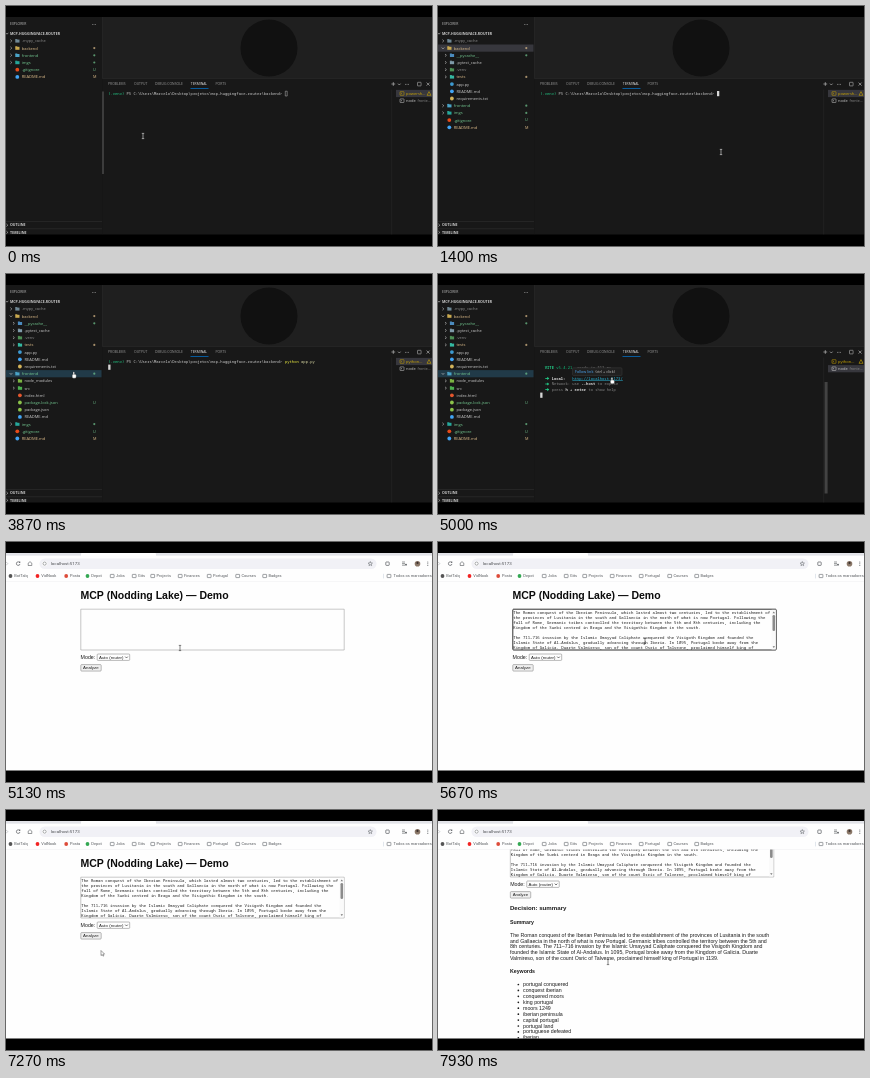
These frames come from a looping animation (426 by 240 pixels, 8000 ms). An HTML page with a canvas:

```html
<!DOCTYPE html>
<html lang="en">
<head>
<meta charset="utf-8">
<title>Router demo</title>
<style>
html, body { margin: 0; width: 100%; height: 100%; overflow: hidden; background: #000; }
canvas { display: block; width: 100vw; height: 100vh; }
</style>
</head>
<body>
<canvas id="stage"></canvas>
<script>
const W = 426, H = 240, LOOP = 8000, TOP = 11, BOTTOM = 228.5;
const canvas = document.getElementById('stage');
const ctx = canvas.getContext('2d');

const UI = '"Open Sans", "Noto Sans", sans-serif';
const CHROME = 'Roboto, sans-serif';
const ARIAL = '"Liberation Sans", Arial, sans-serif';
const MONO = '"Noto Sans Mono", "DejaVu Sans Mono", monospace';

const WHITE = '#cccccc', DIM = '#8c8c8c', GREEN = '#73c991', GOLD = '#e2c08d', WARN = '#cca700';
const INK = '#1c1c1c';

// Moments of the story, in ms
const AT = {
  openBackend: 680, focusTerminal: 1250, type: 1650, run: 2560, pillEnd: 3150,
  openFrontend: 3700, showNode: 4290, tooltip: 4800, browser: 5100,
  paste: 5470, analyze: 6660, result: 7420, scroll: 7620, scrollEnd: 7920
};

const mousePath = [
  [0, 137, 130], [130, 137, 130], [600, 22, 43], [760, 22, 43], [1200, 283, 146],
  [2850, 283, 146], [3580, 26, 101], [3780, 26, 101], [4220, 404, 95], [4340, 404, 95],
  [4780, 174, 106], [5150, 174, 106], [5600, 207, 99], [5850, 207, 99], [6480, 86, 126],
  [6720, 86, 126], [6960, 97, 152], [7200, 95, 143], [7460, 95, 143], [7720, 170, 152], [8000, 170, 152]
];

function mouseAt(t) {
  const i = Math.max(1, mousePath.findIndex(p => p[0] > t));
  const [t0, x0, y0] = mousePath[i - 1], [t1, x1, y1] = mousePath[i];
  const u = (t - t0) / (t1 - t0), e = u * u * (3 - 2 * u);
  return [x0 + (x1 - x0) * e, y0 + (y1 - y0) * e];
}

function box(x, y, w, h, color) {
  ctx.fillStyle = color;
  ctx.fillRect(x, y, w, h);
}
function rounded(x, y, w, h, r, fill, stroke, line = 0.4) {
  ctx.beginPath();
  ctx.roundRect(x, y, w, h, r);
  if (fill) { ctx.fillStyle = fill; ctx.fill(); }
  if (stroke) { ctx.strokeStyle = stroke; ctx.lineWidth = line; ctx.stroke(); }
}
function dot(x, y, r, color) {
  ctx.fillStyle = color;
  ctx.beginPath();
  ctx.arc(x, y, r, 0, 7);
  ctx.fill();
}
function poly(points, stroke, fill, line = 0.6) {
  ctx.beginPath();
  for (let i = 0; i < points.length; i += 2) ctx.lineTo(points[i], points[i + 1]);
  if (fill) { ctx.closePath(); ctx.fillStyle = fill; ctx.fill(); }
  if (stroke) { ctx.strokeStyle = stroke; ctx.lineWidth = line; ctx.stroke(); }
}
// y is the middle of the capital letters
function text(s, x, y, size, color, font = UI, weight = 400) {
  ctx.font = `${weight} ${size}px ${font}`;
  ctx.fillStyle = color;
  ctx.fillText(s, x, y + size * 0.35);
}
function chevron(x, y, open, color = WHITE) {
  poly(open ? [x - 1.3, y - 0.6, x, y + 0.8, x + 1.3, y - 0.6] : [x - 0.6, y - 1.3, x + 0.8, y, x - 0.6, y + 1.3], color);
}
function dots(x, y, color) {
  for (let i = -1; i < 2; i++) dot(x + i * 1.6, y, 0.45, color);
}
function folder(x, y, color) {
  box(x - 2, y - 1.8, 2, 1, color);
  box(x - 2, y - 1.3, 4.2, 3, color);
}

// ---------- editor ----------

// depth, chevron, icon colour, label, label colour, badge
const row = (depth, fold, icon, label, color = WHITE, badge = '') => ({ depth, fold, icon, label, color, badge });

function explorerRows(backend, frontend) {
  const rows = [
    row(0, 'closed', '#6f8794', '.mypy_cache', DIM),
    row(0, backend ? 'open' : 'closed', '#c9a94f', 'backend', GOLD, '*')
  ];
  if (backend) rows.push(
    row(1, 'closed', '#4b8bbe', '__pycache__', GREEN, '*'),
    row(1, 'closed', '#7f9aa8', '.pytest_cache'),
    row(1, 'closed', '#4d8f55', '.venv', DIM),
    row(1, 'closed', '#34b7a0', 'tests', GOLD, '*'),
    row(1, '', '#3d9ad1', 'app.py'),
    row(1, '', '#42a5f5', 'README.md'),
    row(1, '', '#d3b35a', 'requirements.txt'));
  rows.push(row(0, frontend ? 'open' : 'closed', '#4aa3c7', 'frontend', GREEN, '*'));
  if (frontend) rows.push(
    row(1, 'closed', '#7cb342', 'node_modules'),
    row(1, 'closed', '#4caf50', 'src'),
    row(1, '', '#e4572e', 'index.html'),
    row(1, '', '#8bc34a', 'package-lock.json', GREEN, 'U'),
    row(1, '', '#8bc34a', 'package.json'),
    row(1, '', '#42a5f5', 'README.md'));
  rows.push(
    row(0, 'closed', '#26a69a', 'imgs', GREEN, '*'),
    row(0, '', '#e64a19', '.gitignore', GREEN, 'U'),
    row(0, '', '#42a5f5', 'README.md', GOLD, 'M'));
  return rows;
}

function drawExplorer(t) {
  const backend = t >= AT.openBackend, frontend = t >= AT.openFrontend;
  box(0, TOP, 96, BOTTOM - TOP, '#181818');
  box(96, TOP, 0.5, BOTTOM - TOP, '#2b2b2b');
  text('EXPLORER', 4, 18.2, 3.4, '#c4c4c4');
  dots(88, 18.4, WHITE);
  text('MCP-HUGGINGFACE-ROUTER', 4, 27.4, 3.55, WHITE, UI, 700);
  chevron(1, 27.4, true);
  const selected = frontend ? 'frontend' : backend ? 'backend' : '';
  explorerRows(backend, frontend).forEach((r, i) => {
    const y = 34.9 + i * 7.2, x = r.depth * 2.6;
    if (r.label === selected) box(0, y - 3.6, 95.5, 7.2, frontend ? '#213a48' : '#37373d');
    if (r.fold) {
      chevron(5 + x, y, r.fold === 'open');
      folder(11.3 + x, y, r.icon);
    } else dot(11.3 + x, y, 1.9, r.icon);
    text(r.label, 15.8 + x, y, 4.05, r.color);
    if (r.badge === '*') {
      ctx.globalAlpha = 0.7;
      dot(88.3, y, 1.1, r.color);
      ctx.globalAlpha = 1;
    } else text(r.badge, 87, y, 3.8, r.color);
  });
  box(0, 215.2, 96, 0.5, '#333333');
  box(0, 222.6, 96, 0.5, '#333333');
  text('OUTLINE', 4, 219.2, 3.55, WHITE, UI, 700);
  text('TIMELINE', 4, 226.4, 3.55, WHITE, UI, 700);
  chevron(1, 219.2, false);
  chevron(1, 226.4, false);
}

const CELL = 2.296;
const termX = col => 102.2 + col * CELL, termY = line => 87.6 + line * 5.6;
const term = (s, col, line, color, weight) => text(s, termX(col), termY(line), CELL / 0.6, color, MONO, weight);

function termCursor(col, line, solid) {
  const x = termX(col), y = termY(line) - 2.6;
  if (solid) box(x, y, 2.3, 5.2, '#d6d6d6');
  else rounded(x + 0.3, y + 0.2, 1.9, 4.8, 0, null, '#bdbdbd', 0.5);
}

function drawShell(t) {
  const command = 'python app.py';
  const typed = Math.floor(command.length * Math.min(1, Math.max(0, (t - AT.type) / 720)));
  const prompt = 'PS C:\\Users\\Marcelo\\Desktop\\projetos\\mcp-huggingface-router\\backend>';
  term('(.venv)', 0, 0, '#23d18b');
  term(prompt, 8, 0, '#d0d0d0');
  term(command.slice(0, Math.min(6, typed)), 77, 0, '#f5f543');
  if (typed > 7) term(command.slice(7, typed), 84, 0, '#e0dfa8');
  if (t >= AT.run) termCursor(0, 1, true);
  else termCursor(77 + typed, 0, t >= AT.focusTerminal);
  if (t < 450) {
    ctx.globalAlpha = Math.min(1, (450 - t) / 250);
    box(96.2, 85.5, 1.6, 82.5, '#464646');
    ctx.globalAlpha = 1;
  }
  if (t >= AT.run && t < AT.pillEnd) {
    rounded(135, 125.2, 52, 9.2, 4, '#e5e4d8', '#bdbcae', 0.6);
    dot(161, 129.3, 1, '#34405c');
    box(159.8, 130.2, 1.2, 0.8, '#5b6478');
  }
}

function arrowMark(line) {
  const x = termX(2.2), y = termY(line);
  box(x, y - 0.4, 2.6, 0.8, '#23d18b');
  poly([x + 2, y - 1.6, x + 4, y, x + 2, y + 1.6], null, '#23d18b');
}

function drawDevServer(t) {
  const cyan = '#29b8db', grey = '#858585';
  term('VITE', 2, 1, '#23d18b', 700);
  term('v5.4.21', 7, 1, '#0dbc79');
  term('ready in 512 ms', 16, 1, grey);
  [3, 4, 5].forEach(arrowMark);
  term('Local:', 5, 3, '#e5e5e5', 700);
  term('http://localhost:5173/', 14, 3, cyan);
  box(termX(14), termY(3) + 2.1, 22 * CELL, 0.5, cyan);
  term('Network: use', 5, 4, grey);
  term('--host', 18, 4, '#d8d8d8', 700);
  term('to expose', 25, 4, grey);
  term('press', 5, 5, grey);
  term('h + enter', 11, 5, '#d8d8d8', 700);
  term('to show help', 21, 5, grey);
  termCursor(0, 6, true);
  box(386.6, 108, 3, 111.5, '#434343');
  if (t >= AT.tooltip) {
    rounded(134.5, 93.8, 49.5, 7.6, 1, '#202020', '#454545');
    text('Follow link', 137, 97.5, 3.75, '#4daafc');
    text('(ctrl + click)', 157.4, 97.5, 3.75, WHITE);
  }
}

function terminalIcon(x, y, color) {
  rounded(x - 2, y - 1.8, 4, 3.6, 0.4, null, color, 0.5);
  poly([x - 1.2, y - 0.8, x - 0.3, y, x - 1.2, y + 0.8], color, null, 0.5);
}

function drawPanel(t) {
  const node = t >= AT.showNode;
  box(96.5, 72.6, 330, BOTTOM - 72.6, '#181818');
  box(96.5, 72.4, 330, 0.6, '#2b2b2b');
  [['PROBLEMS', 102], ['OUTPUT', 128], ['DEBUG CONSOLE', 149], ['TERMINAL', 184.8], ['PORTS', 209.5]]
    .forEach(([label, x]) => text(label, x, 78.2, 3.4, label === 'TERMINAL' ? '#e7e7e7' : '#9d9d9d'));
  box(184.5, 82, 18, 0.7, '#0078d4');
  poly([385.4, 78, 389.2, 78], WHITE);
  poly([387.3, 76.1, 387.3, 79.9], WHITE);
  chevron(393.3, 78.2, true);
  dots(401, 78.3, WHITE);
  rounded(411.5, 76.3, 3.6, 3.6, 0.4, null, WHITE, 0.5);
  poly([420.6, 76.6, 423.6, 79.6], WHITE);
  poly([423.6, 76.6, 420.6, 79.6], WHITE);

  box(385.6, 83.5, 0.5, BOTTOM - 83.5, '#2b2b2b');
  box(390, node ? 91.1 : 83.9, 36, 7.2, '#37373d');
  terminalIcon(396, 87.5, WARN);
  text(t >= AT.run ? 'python…' : 'powersh…', 400, 87.5, 4.05, WARN);
  poly([421, 89.3, 423, 85.6, 425, 89.3, 421, 89.3], WARN, null, 0.6);
  terminalIcon(396, 94.7, WHITE);
  text('node', 400, 94.7, 4.05, WHITE);
  text('fronte…', 411.5, 94.7, 3.6, '#8f8f8f');

  if (node) drawDevServer(t); else drawShell(t);
}

function drawEditor(t) {
  box(96, TOP, 330, 62, '#1f1f1f');
  dot(263, 42, 28.5, '#111111');
  drawExplorer(t);
  drawPanel(t);
}

// ---------- browser ----------

const bookmarks = [
  ['BotTalq', 8.3, '#555555'], ['VidNook', 35.3, '#f22323'], ['Posta', 64, '#dd4b39'], ['Depot', 85.3, '#34a853'],
  ['Jobs', 110], ['Gits', 132], ['Projects', 150.5], ['Finances', 178],
  ['Portugal', 207], ['Courses', 235.5], ['Badges', 262.5]
];

function bookmarkFolder(x) {
  rounded(x - 1.9, 32.4, 3.8, 3.2, 0.4, null, '#5f6368', 0.6);
}

function drawChrome() {
  const ink = '#55585c';
  box(0, TOP, W, BOTTOM - TOP, '#fefefe');
  box(0, TOP, W, 2.6, '#e2e3e8');
  rounded(75, TOP, 75, 4, 1, '#fefefe');
  poly([0, 19.8, 1.8, 21.6, 0, 23.4], '#a5a8ac');
  ctx.beginPath();
  ctx.arc(12.2, 21.6, 1.8, 0.2, 5.5);
  ctx.strokeStyle = ink;
  ctx.lineWidth = 0.7;
  ctx.stroke();
  box(13, 19.6, 1.3, 1.2, ink);
  poly([22.2, 23.5, 22.2, 21.1, 24, 19.7, 25.8, 21.1, 25.8, 23.5, 22.1, 23.5], ink);
  rounded(33.5, 16.4, 337, 10.6, 5.3, '#f1f1f6');
  dot(38.6, 21.6, 2.7, '#ffffff');
  ctx.beginPath();
  ctx.arc(38.6, 21.6, 1.6, 0, 7);
  ctx.strokeStyle = ink;
  ctx.lineWidth = 0.5;
  ctx.stroke();
  text('localhost:5173', 44.8, 21.7, 4.4, '#4a4c50', CHROME);
  const star = [];
  for (let i = 0; i <= 10; i++) {
    const a = i * Math.PI / 5 - Math.PI / 2, r = i % 2 ? 1 : 2.3;
    star.push(364.3 + r * Math.cos(a), 21.8 + r * Math.sin(a));
  }
  poly(star, ink, null, 0.5);
  rounded(379.8, 20, 3.4, 3.4, 0.5, null, ink, 0.7);
  [20, 21.6, 23.2].forEach(y => poly([396, y, 399, y], ink));
  dot(400, 22.7, 0.9, ink);
  dot(411.5, 21.7, 2.8, '#8a7768');
  dot(411.5, 20.9, 1.1, '#3b302c');
  [20, 21.7, 23.4].forEach(y => dot(421.8, y, 0.5, ink));
  bookmarks.forEach(([label, x, color]) => {
    if (color) dot(x - 3.8, 34, 1.9, color); else bookmarkFolder(x - 3.8);
    text(label, x, 34, 3.95, '#55585c', CHROME);
  });
  box(377.3, 31.8, 0.5, 4.6, '#c4cedb');
  bookmarkFolder(383);
  text('Todos os marcadores', 387.6, 34, 3.95, '#55585c', CHROME);
  box(0, 39.2, W, 0.4, '#e8e8ec');
}

const KING = ['Duarte', 'Valmireso'], COUNT = 'Osric of Talverne';
const article = [
  'The Roman conquest of the Iberian Peninsula, which lasted almost two centuries, led to the establishment of',
  'the provinces of Lusitania in the south and Gallaecia in the north of what is now Portugal. Following the',
  'fall of Rome, Germanic tribes controlled the territory between the 5th and 8th centuries, including the',
  'Kingdom of the Suebi centred in Braga and the Visigothic Kingdom in the south.',
  '',
  'The 711–716 invasion by the Islamic Umayyad Caliphate conquered the Visigoth Kingdom and founded the',
  'Islamic State of Al-Andalus, gradually advancing through Iberia. In 1095, Portugal broke away from the',
  `Kingdom of Galicia. ${KING.join(' ')}, son of the count ${COUNT}, proclaimed himself king of`
];
const summary = [
  'The Roman conquest of the Iberian Peninsula led to the establishment of the provinces of Lusitania in the south',
  'and Gallaecia in the north of what is now Portugal. Germanic tribes controlled the territory between the 5th and',
  '8th centuries. The 711–716 invasion by the Islamic Umayyad Caliphate conquered the Visigoth Kingdom and',
  `founded the Islamic State of Al-Andalus. In 1095, Portugal broke away from the Kingdom of Galicia. ${KING[0]}`,
  `${KING[1]}, son of the count ${COUNT}, proclaimed himself king of Portugal in 1139.`
];
const keywords = ['portugal conquered', 'conquest iberian', 'conquered moors', 'king portugal', 'moors 1249',
  'iberian peninsula', 'capital portugal', 'portugal land', 'portuguese defeated', 'iberian'];

function drawTextarea(t) {
  const focused = t >= AT.paste - 80 && t < AT.analyze;
  rounded(74.8, 67.2, 263.4, 40.8, focused ? 0.8 : 0, '#fefefe', focused ? '#1a1a1a' : '#8f8f8f', focused ? 0.9 : 0.5);
  if (t < AT.paste) return;
  article.forEach((s, i) => text(s, 75.3, 70.7 + i * 4.92, 4.01, INK, MONO));
  box(333.6, 67.8, 4.2, 39.6, '#fafafa');
  poly([334.6, 71.2, 335.8, 69.4, 337, 71.2], null, '#777777');
  poly([334.6, 104.2, 335.8, 106, 337, 104.2], null, '#777777');
  rounded(334.5, 73, 2.6, 16, 1.3, '#8b8b8b');
}

function drawResult() {
  text('Decision: summary', 74.4, 139, 6.14, INK, ARIAL, 700);
  text('Summary', 74.4, 152.8, 5.25, INK, ARIAL, 700);
  summary.forEach((s, i) => text(s, 74.4, 165.8 + i * 5.93, 5.25, INK, ARIAL));
  text('Keywords', 74.4, 202.3, 5.25, INK, ARIAL, 700);
  keywords.forEach((s, i) => {
    const y = 215.2 + i * 5.93;
    dot(82.8, y + 0.3, 0.85, INK);
    text(s, 87.5, y, 5.25, INK, ARIAL);
  });
}

function drawPage(t) {
  const done = t >= AT.result;
  const steps = 5, u = Math.min(1, Math.max(0, (t - AT.scroll) / (AT.scrollEnd - AT.scroll)));
  const scroll = 41 * Math.ceil(u * steps) / steps;
  ctx.save();
  ctx.beginPath();
  ctx.rect(0, 39.6, W, BOTTOM - 39.6);
  ctx.clip();
  ctx.translate(done ? -2.46 : 0, -scroll);
  text('MCP (Nodding Lake) — Demo', 74.4, 53.5, 10.5, '#0c0c0c', ARIAL, 700);
  drawTextarea(t);
  text('Mode:', 74.6, 115, 5.25, INK, ARIAL);
  rounded(91.2, 112, 32.5, 6.4, 0.8, '#fefefe', '#777777', 0.5);
  text('Auto (router)', 93, 115.2, 4.37, INK, ARIAL);
  poly([119.2, 114.6, 120.5, 116, 121.8, 114.6], INK, null, 0.6);
  rounded(74.8, 122.6, 20.4, 6.5, 0.9, '#efefef', '#767676', 0.5);
  text('Analyze', 77.1, 125.9, 4.37, INK, ARIAL);
  if (done) drawResult();
  ctx.restore();
}

// ---------- pointer ----------

function pointerKind(t, x, y) {
  if (t < AT.browser) {
    if (x < 96 || t >= AT.tooltip - 60) return 'hand';
    return x < 386 && y > 83 ? 'beam' : 'arrow';
  }
  if (t < AT.result) return x > 75 && x < 333 && y > 67 && y < 108 ? 'beam' : 'arrow';
  return x > 110 ? 'beam' : 'arrow';
}

function drawPointer(t) {
  const [x, y] = mouseAt(t), kind = pointerKind(t, x, y);
  const ink = t < AT.browser ? '#e8e8e8' : '#333333';
  if (kind === 'beam') {
    poly([x, y - 2.5, x, y + 2.5], ink);
    poly([x - 1.2, y - 2.6, x + 1.2, y - 2.6], ink);
    poly([x - 1.2, y + 2.6, x + 1.2, y + 2.6], ink);
  } else if (kind === 'hand') {
    rounded(x - 0.8, y - 2.6, 1.5, 4, 0.7, '#fff', '#111', 0.3);
    rounded(x - 1.6, y, 4, 3.8, 1.2, '#fff', '#111', 0.3);
  } else {
    poly([x, y - 2.5, x, y + 2.6, x + 1.2, y + 1.5, x + 2, y + 3.2, x + 2.8, y + 2.8, x + 2.1, y + 1.2, x + 3.6, y + 1.1, x, y - 2.5],
      '#333', '#fff', 0.45);
  }
}

function render(t) {
  const ratio = window.devicePixelRatio || 1;
  const w = Math.round(innerWidth * ratio), h = Math.round(innerHeight * ratio);
  if (canvas.width !== w || canvas.height !== h) {
    canvas.width = w;
    canvas.height = h;
  }
  ctx.setTransform(w / W, 0, 0, h / H, 0, 0);
  box(0, 0, W, H, '#000');
  if (t < AT.browser) drawEditor(t);
  else {
    drawChrome();
    drawPage(t);
  }
  drawPointer(t);
}

const start = performance.now();
function tick() {
  render((performance.now() - start) % LOOP);
  requestAnimationFrame(tick);
}
tick();
</script>
</body>
</html>
```
